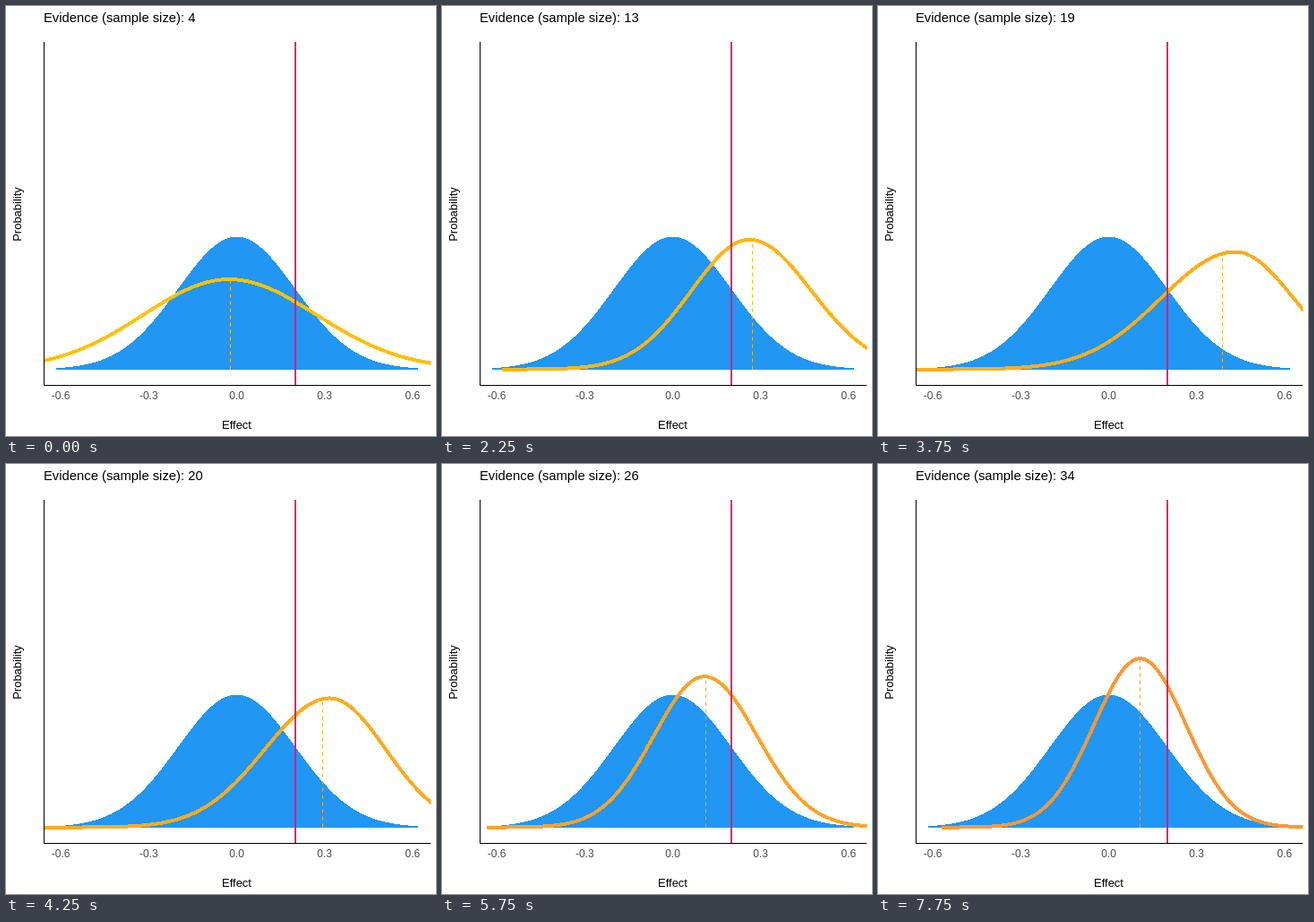
Animation of 480 by 480 pixels, one loop 8 s. Source, as an HTML page:

```html
<!DOCTYPE html>
<html lang="en">
<head>
<meta charset="utf-8">
<title>Evidence and effect</title>
<style>
  html, body { margin: 0; width: 100%; height: 100%; overflow: hidden; background: #fff; }
  svg { display: block; width: 480px; height: 480px; }
  text { font: 13px "Liberation Sans", Arial, sans-serif; }
  .title { font-size: 14.8px; }
  .ticks text { font-size: 12px; fill: #4d4d4d; }
  .mid, .ticks { text-anchor: middle; }
  #prior, #curve { shape-rendering: crispEdges; }
</style>
</head>
<body>
<svg viewBox="0 0 480 480">
  <clipPath id="panel"><rect x="42" y="40" width="432.5" height="383"/></clipPath>
  <text class="title" x="42" y="18">Evidence (sample size): <tspan id="count">4</tspan></text>
  <g clip-path="url(#panel)" fill="none">
    <path id="prior" fill="#2196f3"/>
    <path id="mean" stroke-width="1" stroke-dasharray="4 4"/>
    <path id="curve" stroke-width="4" stroke-linejoin="round"/>
    <path d="M323 40V423" stroke="#e91e63" stroke-width="2"/>
  </g>
  <path d="M42.5 40V423.5H474" fill="none" stroke="#000"/>
  <g class="ticks" id="ticks"></g>
  <text class="mid" x="257.5" y="472">Effect</text>
  <text class="mid" transform="translate(17 232.5) rotate(-90)">Probability</text>
</svg>
<script>
const $ = id => document.getElementById(id);
const BASE = 405.6, ZERO = 257.5, RIGHT = 478;
const AREA = 9700; // peak height times spread, the same for every density
const STEP = 250, STEPS = 32;

// Posterior at a few steps: mean and spread on either side of the mode
const keys = [
  { step: 0, mean: 250.5, left: 95.5, right: 97.5 },
  { step: 5, mean: 306.5, left: 79, right: 79 },
  { step: 9, mean: 346.5, left: 65, right: 69 },
  { step: 15, mean: 384.5, left: 83, right: 65 },
  { step: 20, mean: 307, left: 56, right: 58.5 },
  { step: 26, mean: 282, left: 57.5, right: 58.5 },
  { step: 31, mean: 292.5, left: 51.5, right: 51.5 }
];

const lerp = (a, b, u) => a + (b - a) * u;

function posterior(step) {
  const i = Math.max(1, keys.findIndex(k => k.step >= step));
  const a = keys[i - 1], b = keys[i], u = (step - a.step) / (b.step - a.step);
  const mix = name => lerp(a[name], b[name], u);
  return { mean: mix("mean"), left: mix("left"), right: mix("right") };
}

// Two-sided normal density, as screen y
function density({ mean, left, right }) {
  const mode = mean - Math.sqrt(2 / Math.PI) * (right - left);
  const peak = AREA * 2 / (left + right);
  return x => {
    const z = (x - mode) / (x < mode ? left : right);
    return BASE - peak * Math.exp(-z * z / 2);
  };
}

function trace(y, from, to) {
  let d = `M${from} ${y(from)}`;
  for (let x = from + 2; x <= to; x += 2) d += `L${x} ${y(x)}`;
  return d;
}

function drawPrior() {
  const y = density({ mean: ZERO, left: 65.5, right: 65.5 });
  $("prior").setAttribute("d", trace(y, ZERO - 202, ZERO + 202) + `V${BASE}H${ZERO - 202}Z`);
}

function drawTicks() {
  for (let i = -2; i <= 2; i++) {
    const t = document.createElementNS("http://www.w3.org/2000/svg", "text");
    t.setAttribute("x", ZERO + i * 98.2);
    t.setAttribute("y", 439);
    t.textContent = (i * 0.3).toFixed(1);
    $("ticks").append(t);
  }
}

function draw(step) {
  const p = posterior(step), y = density(p), u = step / (STEPS - 1);
  const color = `rgb(255,${Math.round(lerp(193, 152, u))},${Math.round(lerp(7, 56, u))})`;
  $("curve").setAttribute("d", trace(y, Math.max(40, p.mean - 4.3 * p.left), RIGHT));
  $("mean").setAttribute("d", `M${p.mean} ${BASE}V${y(p.mean)}`);
  for (const id of ["curve", "mean"]) $(id).setAttribute("stroke", color);
  $("count").textContent = Math.round(lerp(4, 34, u));
}

let shown = -1;
function tick() {
  const step = Math.floor(performance.now() / STEP) % STEPS;
  if (step !== shown) draw(shown = step);
  requestAnimationFrame(tick);
}

drawPrior();
drawTicks();
tick();
</script>
</body>
</html>
```
